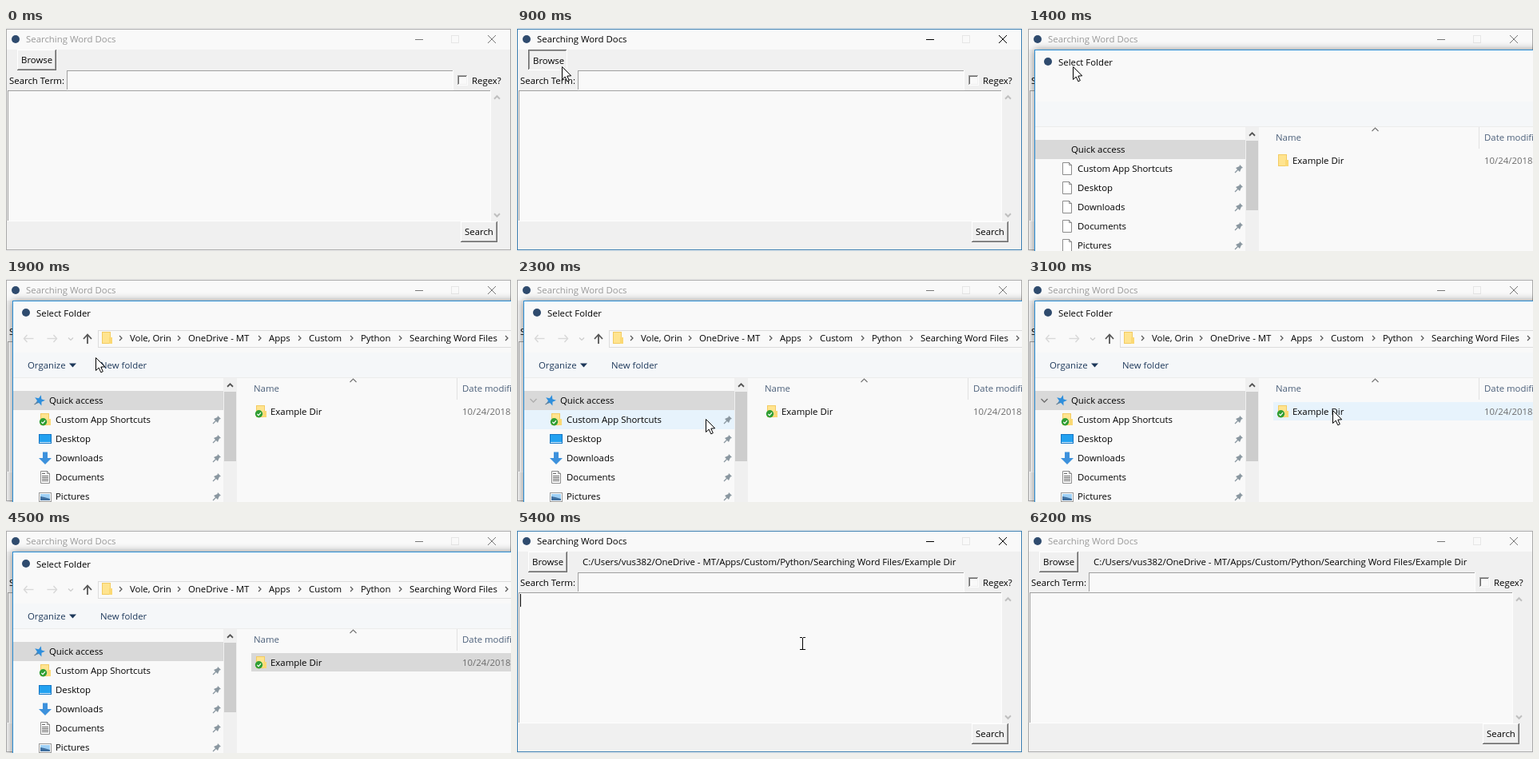
An HTML page with a canvas that plays this animation: 632 by 279 pixels, repeating every 6.3 s.

```html
<!DOCTYPE html>
<html lang="en">
<head>
<meta charset="utf-8">
<title>Folder search</title>
<style>
  html, body { margin: 0; width: 100%; height: 100%; overflow: hidden; background: #f0f0f0; }
  canvas { display: block; }
</style>
</head>
<body>
<canvas id="stage" width="632" height="279"></canvas>
<script>
const LOOP = 6300, STEP = 100;
const PAPER = '#f9f9f9', FACE = '#f0f0f0', GREY = '#a0a0a0', DARK = '#696969', BLUE = '#2a8dd4';
const c = document.getElementById('stage').getContext('2d');

const box = (x, y, w, h, color) => { c.fillStyle = color; c.fillRect(x, y, w, h); };

function text(s, x, y, color = '#000') {
  c.font = "11.4px 'Open Sans', 'Noto Sans', sans-serif";
  c.fillStyle = color;
  c.fillText(s, x, y);
}

function path(points, close) {
  c.beginPath();
  points.forEach(([x, y]) => c.lineTo(x, y));
  if (close) c.closePath();
}

function line(points, color, width = 1) {
  path(points);
  c.strokeStyle = color;
  c.lineWidth = width;
  c.stroke();
}

function frame(x, y, w, h, color) {
  c.strokeStyle = color;
  c.lineWidth = 1;
  c.strokeRect(x + 0.5, y + 0.5, w - 1, h - 1);
}

function shape(points, fill, edge) {
  path(points, true);
  c.fillStyle = fill;
  c.fill();
  if (edge) { c.strokeStyle = edge; c.lineWidth = 1; c.stroke(); }
}

function dot(x, y, r, color) {
  c.beginPath();
  c.arc(x, y, r, 0, 7);
  c.fillStyle = color;
  c.fill();
}

// Two-tone bevel: first colour on top and left, second on bottom and right
function bevel(x, y, w, h, light, shade) {
  box(x, y, w, 1, light);
  box(x, y, 1, h, light);
  box(x, y + h - 1, w, 1, shade);
  box(x + w - 1, y, 1, h, shade);
}

function button(label, x, y, w, h, down) {
  box(x, y, w, h, FACE);
  bevel(x + 1, y + 1, w - 2, h - 2, down ? GREY : FACE, down ? FACE : GREY);
  bevel(x, y, w, h, down ? DARK : '#fff', down ? '#fff' : DARK);
  text(label, x + 5 + down, y + 17 + down);
}

function field(x, y, w, h) {
  box(x, y, w, h, PAPER);
  bevel(x, y, w, h, GREY, '#fdfdfd');
}

// Chevrons: d gives the pointing direction
const vChevron = (x, y, d, color, r = 3.5, width = 1.5) =>
  line([[x - r, y - d * r / 2], [x, y + d * r / 2], [x + r, y - d * r / 2]], color, width);
const hChevron = (x, y, color = '#555') =>
  line([[x - 1.5, y - 3], [x + 1.5, y], [x - 1.5, y + 3]], color, 1.2);

function mainWindow(active, pressed, chosen) {
  const ink = active ? '#000' : '#777';
  box(0, 0, 632, 279, FACE);
  box(1, 2, 630, 25, PAPER);
  frame(0, 1, 632, 277, active ? '#3c7fb1' : '#aaa');
  dot(12, 14, 5, '#2f4b6e');
  text('Searching Word Docs', 25, 18, active ? '#000' : '#999');
  box(512, 14, 10, 1, ink);
  frame(557, 9, 10, 10, '#e6e6e6');
  line([[603, 9], [613, 19]], ink);
  line([[613, 9], [603, 19]], ink);

  button('Browse', 14, 27, 49, 26, pressed);
  if (chosen) text('C:/Users/vus382/OneDrive - MT/Apps/Custom/Python/Searching Word Files/Example Dir', 82, 44);
  text('Search Term:', 4, 70);
  field(76, 53, 484, 25);
  field(565, 59, 13, 13);
  bevel(566, 60, 11, 11, DARK, FACE);
  text('Regex?', 583, 70);
  field(2, 78, 605, 164);
  vChevron(614.5, 87, -1, '#bfbfbf', 3.5, 2);
  vChevron(614.5, 234, 1, '#bfbfbf', 3.5, 2);
  button('Search', 569, 242, 46, 26, 0);
}

function folder(x, y, synced) {
  box(x, y, 11, 15, '#f3cb62');
  box(x + 1, y + 1, 9, 13, '#ffe48f');
  box(x + 9, y + 7, 4, 8, '#fbd974');
  if (!synced) return;
  dot(x + 3.5, y + 10.8, 4.7, '#2f9e34');
  line([[x + 1.3, y + 10.8], [x + 3, y + 12.6], [x + 6, y + 9.1]], '#fff', 1.2);
}

function page(x, y) {
  shape([[x + .5, y + .5], [x + 8.5, y + .5], [x + 11.5, y + 3.5], [x + 11.5, y + 15.5], [x + .5, y + 15.5]], '#fff', '#8c8c8c');
  line([[x + 8.5, y], [x + 8.5, y + 3.5], [x + 12, y + 3.5]], '#8c8c8c');
}

const icons = [
  y => folder(43, y - 8, true),
  y => {
    box(41, y - 6, 16, 12, '#1576c4');
    box(42, y - 5, 14, 9, '#22a1f0');
    box(42, y + 4, 14, 1, '#d6ecfb');
  },
  y => shape([[46, y - 7.5], [52, y - 7.5], [52, y], [57, y], [49, y + 8], [41, y], [46, y]], '#3d91dc'),
  y => {
    page(43, y - 8);
    box(45, y - 5, 4, 1, '#666');
    for (let i = 0; i < 4; i++) box(45, y - 2 + i * 2, 8, 1, '#666');
  },
  y => {
    box(41, y - 5, 16, 12, '#fff');
    frame(41, y - 5, 16, 12, '#9a9a9a');
    box(43, y - 3, 12, 8, '#9fd0f5');
    shape([[43, y + 5], [43, y], [48, y + 1], [55, y + 3], [55, y + 5]], '#3f6f9f');
  }
];

function pin(x, y) {
  shape([[x + 1, y - 5], [x + 5, y - 1], [x + 3, y - 0.5], [x + 1, y + 4], [x - 4, y - 1], [x + 0.5, y - 3]], '#8a97a0');
  line([[x - 1, y + 1], [x - 5, y + 5]], '#8a97a0', 1.2);
}

function star(x, y) {
  const points = Array.from({ length: 10 }, (_, i) => {
    const r = i % 2 ? 3 : 7, a = i * Math.PI / 5 - 1.3;
    return [x + r * Math.cos(a), y + r * Math.sin(a)];
  });
  shape(points, '#2f8fdc');
  line([[x - 6.5, y + 5], [x - 2, y + 2]], '#6b7f8f', 1.2);
}

function arrow(x, y, d, color) {
  line([[x - 6, y], [x + 6, y]], color, 1.4);
  line([[x + d * 2, y - 4.5], [x + d * 6, y], [x + d * 2, y + 4.5]], color, 1.4);
}

function navigation() {
  arrow(28.5, 74.5, -1, '#d8d8d8');
  arrow(57.5, 74.5, 1, '#d8d8d8');
  vChevron(81, 75, 1, '#ccc', 3, 1.2);
  line([[102, 81], [102, 70]], '#555', 1.8);
  line([[97, 75], [102, 69.5], [107, 75]], '#555', 1.8);
  frame(115, 64, 530, 22, '#dcdcdc');
  folder(120, 66);
  [['Vole, Orin', 155], ['OneDrive - MT', 228], ['Apps', 329], ['Custom', 379],
   ['Python', 444], ['Searching Word Files', 505], ['', 638]].forEach(([s, x]) => {
    hChevron(x - 11.5, 74);
    text(s, x, 78);
  });
  text('Organize', 27, 112, '#1e395b');
  shape([[79, 105.5], [88, 105.5], [83.5, 110.5]], '#1e395b');
  text('New folder', 118, 112, '#1e395b');
}

function dialog(t, mouse) {
  const ready = t >= 1500, loaded = t >= 1600;
  c.save();
  c.shadowColor = 'rgba(0,0,0,.45)';
  c.shadowBlur = 9;
  box(8, 27, 640, 270, PAPER);
  c.restore();
  frame(8, 27, 640, 270, BLUE);
  dot(25, 42, 5, '#2f4b6e');
  text('Select Folder', 38, 47);
  box(9, 92, 623, 31, '#f5f7f9');
  box(9, 123, 623, 1, '#ececec');
  if (ready) navigation();

  // Folder tree
  const inTree = mouse && mouse[0] < 272;
  const hover = inTree ? Math.floor((mouse[1] - 164) / 24) : -1;
  box(9, 140, 263, 24, '#d9d9d9');
  if (hover >= 0) box(9, 164 + hover * 24, 263, 24, '#e7f3fc');
  if (loaded) star(42, 152);
  const glow = Math.min((t - 2100) / 500, (3700 - t) / 500, 1);
  if (glow > 0) vChevron(20.5, 152, 1, `rgba(110,110,110,${glow})`, 4, 1.3);
  text('Quick access', 54, 156);
  ['Custom App Shortcuts', 'Desktop', 'Downloads', 'Documents', 'Pictures'].forEach((s, i) => {
    const y = 176 + i * 24;
    loaded ? icons[i](y) : page(43, y - 8);
    text(s, 62, y + 4);
    pin(264, y);
  });
  box(272, 124, 17, 155, FACE);
  vChevron(280.5, 133, -1, '#555', 3.5, 1.8);
  box(273, 141, 15, 87, '#cdcdcd');

  // File list
  const overRow = mouse && mouse[0] > 306 && mouse[1] > 153 && mouse[1] < 178;
  const row = t >= 4500 ? '#d9d9d9' : t >= 3400 ? '#cce8ff' : overRow && '#e7f3fc';
  if (row) box(307, 154, 325, 23, row);
  text('Name', 310, 141, '#4c607a');
  vChevron(434.5, 127, -1, '#777', 4, 1.2);
  box(564, 124, 1, 27, '#e2e2e2');
  text('Date modified', 571, 141, '#4c607a');
  folder(313, 158, loaded);
  text('Example Dir', 331, 170);
  text('10/24/2018', 571, 170, '#6d6d6d');
}

// Pointer keys: time, x, y
const toButton = [[300, 619, 2], [400, 480, 14], [500, 270, 30], [600, 110, 44], [700, 56, 48],
  [1500, 56, 48], [1900, 112, 98], [2100, 180, 150], [2300, 236, 175], [2400, 250, 196],
  [2500, 262, 214], [2600, 300, 211], [2800, 345, 190], [3100, 381, 164], [3500, 377, 169], [4500, 377, 169]];
const inText = [[5100, 512, 196], [5200, 494, 203], [5300, 359, 156], [5400, 357, 142],
  [5600, 340, 83], [5800, 344, 97], [5900, 344, 97]];

function along(keys, t) {
  const i = keys.findIndex(k => k[0] > t);
  if (i < 1) return null;
  const [a, b] = [keys[i - 1], keys[i]], p = (t - a[0]) / (b[0] - a[0]);
  return [a[1] + (b[1] - a[1]) * p, a[2] + (b[2] - a[2]) * p].map(Math.round);
}

function pointer(x, y) {
  shape([[0, 0], [0, 16], [3.7, 12.6], [6.3, 18.3], [8.8, 17.2], [6.3, 11.6], [11.2, 11.3]]
    .map(([dx, dy]) => [x + 0.5 + dx, y + 0.5 + dy]), '#fff', '#000');
}

function beam(x, y) {
  box(x, y - 7, 1, 15, '#000');
  for (const dy of [-8, 7]) {
    box(x - 3, y + dy, 3, 1, '#000');
    box(x + 1, y + dy, 3, 1, '#000');
  }
}

function draw(t) {
  const open = t >= 1300 && t < 4600;
  const pressed = t >= 900 && t < 1100;
  const active = pressed || t >= 4600 && t < 6200;
  const mouse = along(toButton, t), ibeam = along(inText, t);
  mainWindow(active, +pressed, t >= 4900);
  if (open) dialog(t, mouse);
  if (t >= 5300 && t < 5900) box(4, 80, 1, 16, '#000');
  if (mouse) pointer(...mouse);
  if (ibeam) beam(...ibeam);
  if (t === 5900) pointer(607, 87);
}

const start = performance.now();
function tick() {
  const t = (performance.now() - start) % LOOP;
  draw(Math.floor(t / STEP) * STEP);
  requestAnimationFrame(tick);
}
tick();
</script>
</body>
</html>
```
